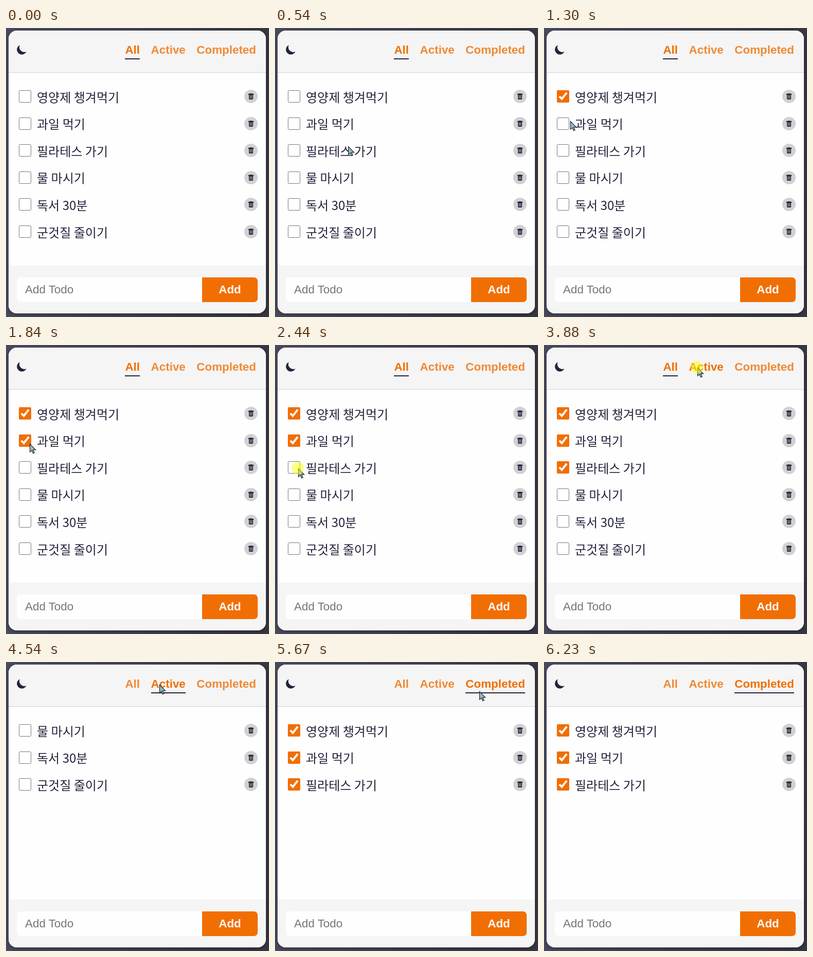
Write an HTML page that moves like this. It is 511 px wide and 562 px high and loops after 6760 ms.

```html
<!DOCTYPE html>
<html lang="ko">
<head>
<meta charset="utf-8">
<title>Todo</title>
<style>
  html, body { margin: 0; width: 100%; height: 100%; overflow: hidden; }
  body { background: linear-gradient(to right, #4a4a5f, #373743); }
  #card {
    position: absolute; left: 5px; top: 5px; width: 500px; height: 550px;
    border-radius: 16px; overflow: hidden; background: #fefefe;
    box-shadow: 0 3px 8px rgba(0, 0, 0, .3);
  }
  header, footer { position: absolute; width: 100%; background: #f5f5f5; }
  header { top: 0; height: 81px; border-bottom: 1px solid #d1d1d1; }
  footer { bottom: 0; height: 93px; }
  svg { position: absolute; left: 0; top: 0; }
  .ui { font: 22.4px "Liberation Sans", Arial, sans-serif; }
  .bold { font-weight: bold; }
  .todo {
    font: 24px "Noto Sans CJK KR", "Noto Sans CJK", "Noto Sans KR", sans-serif;
    word-spacing: -1.2px; fill: #22243b;
  }
</style>
</head>
<body>
<div id="card"><header></header><footer></footer></div>
<svg width="511" height="562" viewBox="0 0 511 562">
  <defs>
    <g id="trash">
      <circle r="13" fill="#d1d1d1"/>
      <g transform="scale(.8) translate(-8 -7.5)" fill="#22243b">
        <rect x="6" width="4" height="2" rx="1"/>
        <rect x="1.5" y="1" width="13" height="3" rx="1"/>
        <path d="M3 4H13V13Q13 15 11 15H5Q3 15 3 13Z"/>
        <path d="M5.5 5.5V12.5M8 5.5V12.5M10.5 5.5V12.5" stroke="#d1d1d1" stroke-linecap="round"/>
      </g>
    </g>
    <g id="empty">
      <rect x=".5" y=".5" width="23" height="23" rx="2" fill="#fff" stroke="#767676"/>
    </g>
    <g id="ticked">
      <rect width="24" height="24" rx="2" fill="#f16e03"/>
      <path d="M4.8 12L9.6 16.8L19.2 4.8" fill="none" stroke="#fff" stroke-width="3.84"/>
    </g>
  </defs>
  <path transform="translate(18.8 30) scale(1.2)" fill="#22243b"
    d="M17.293 13.293A8 8 0 0 1 6.707 2.707a8 8 0 1 0 10.586 10.586z"/>
  <g id="tabs" class="ui bold" fill="#f16e03"></g>
  <rect id="underline" y="59" height="2" fill="#22243b"/>
  <g id="list"></g>
  <path d="M381 485H28A7 7 0 0 0 21 492V526A7 7 0 0 0 28 533H381Z" fill="#fefefe"/>
  <text class="ui" x="37" y="516" fill="#757575">Add Todo</text>
  <g id="add">
    <path d="M381 485H482A7 7 0 0 1 489 492V526A7 7 0 0 1 482 533H381Z" fill="#f16e03"/>
    <text class="ui bold" x="435" y="516" text-anchor="middle" fill="#fefefe">Add</text>
  </g>
  <g id="pointer">
    <path d="M.5.5V16.2L4.1 12.9L6.7 18.6L9.2 17.4L6.6 11.9H11.6Z" fill="#94bcc6" stroke="#20262b" stroke-width="1.2"/>
    <circle id="press" cx="-.5" cy="-.5" r="12" fill="#ff0" fill-opacity=".5"/>
  </g>
</svg>
<script>
const LOOP = 6760, PITCH = 52.55;
const $ = id => document.getElementById(id);

function add(parent, tag, attrs, text = '') {
  const el = document.createElementNS('http://www.w3.org/2000/svg', tag);
  for (const k in attrs) el.setAttribute(k, attrs[k]);
  el.textContent = text;
  return parent.appendChild(el);
}
const show = (el, on) => el.setAttribute('visibility', on ? 'visible' : 'hidden');

// tabs are laid out from the right edge
let right = 486;
const tabs = ['Completed', 'Active', 'All'].map(name => {
  const el = add($('tabs'), 'text', { y: 50 }, name);
  const w = el.getComputedTextLength(), x = right - w;
  el.setAttribute('x', x);
  right = x - 21.5;
  return { x, w, el };
}).reverse();

const todos = ['영양제 챙겨먹기', '과일 먹기', '필라테스 가기', '물 마시기', '독서 30분', '군것질 줄이기']
  .map(name => {
    const row = add($('list'), 'g', {});
    return {
      row,
      box: add(row, 'use', { x: 25 }),
      label: add(row, 'text', { class: 'todo', x: 60 }, name),
      bin: add(row, 'use', { href: '#trash', x: 476 })
    };
  });

// press and release times: three checkboxes, then two tabs
const clicks = [[1090, 1160], [1700, 1770], [2440, 2510], [3880, 4010], [5140, 5210]];

// pointer strokes: start, end, x, y reached
const entry = [430, 507];
const strokes = [
  [130, 750, 38, 130], [820, 890, 45, 130], [1160, 1350, 52, 191], [1400, 1700, 46, 191],
  [1800, 2400, 45, 240], [2510, 3280, 298, 44], [4540, 4940, 395, 47], [5620, 6230, 485, 562]
];

function pointerAt(t) {
  let [x, y] = entry;
  for (const [from, to, x1, y1] of strokes) {
    const k = Math.min(1, Math.max(0, (t - from) / (to - from)));
    const e = k * k * (3 - 2 * k);
    x += (x1 - x) * e;
    y += (y1 - y) * e;
  }
  return [Math.round(x), Math.round(y)];
}

function draw(t) {
  const [px, py] = pointerAt(t);
  const present = t >= strokes[0][0] && t < strokes.at(-1)[1];
  const over = (x, y, w, h) => present && px >= x && px < x + w && py >= y && py < y + h;
  const released = clicks.filter(([, up]) => t >= up).length;

  const selected = Math.max(0, released - 3);
  tabs.forEach(({ x, w, el }, i) =>
    el.setAttribute('opacity', i === selected || over(x, 29, w, 32) ? 1 : .8));
  const { x, w } = tabs[selected], left = Math.round(x);
  $('underline').setAttribute('x', left);
  $('underline').setAttribute('width', Math.round(x + w) - left);

  let y = 121;
  todos.forEach(({ row, box, label, bin }, i) => {
    const done = i < Math.min(3, released);
    const visible = selected === 0 || done === (selected === 2);
    show(row, visible);
    if (!visible) return;
    box.setAttribute('href', done ? '#ticked' : '#empty');
    box.setAttribute('y', Math.round(y));
    bin.setAttribute('y', Math.round(y) + 12);
    label.setAttribute('y', Math.round(y + 22.8));
    y += PITCH;
  });

  $('add').style.filter = over(381, 485, 108, 48) ? 'brightness(120%)' : 'none';
  show($('pointer'), present);
  $('pointer').setAttribute('transform', `translate(${px} ${py})`);
  show($('press'), clicks.some(([down, up]) => t >= down && t < up));
}

const start = performance.now();
function tick() {
  draw((performance.now() - start) % LOOP);
  requestAnimationFrame(tick);
}
tick();
</script>
</body>
</html>
```
